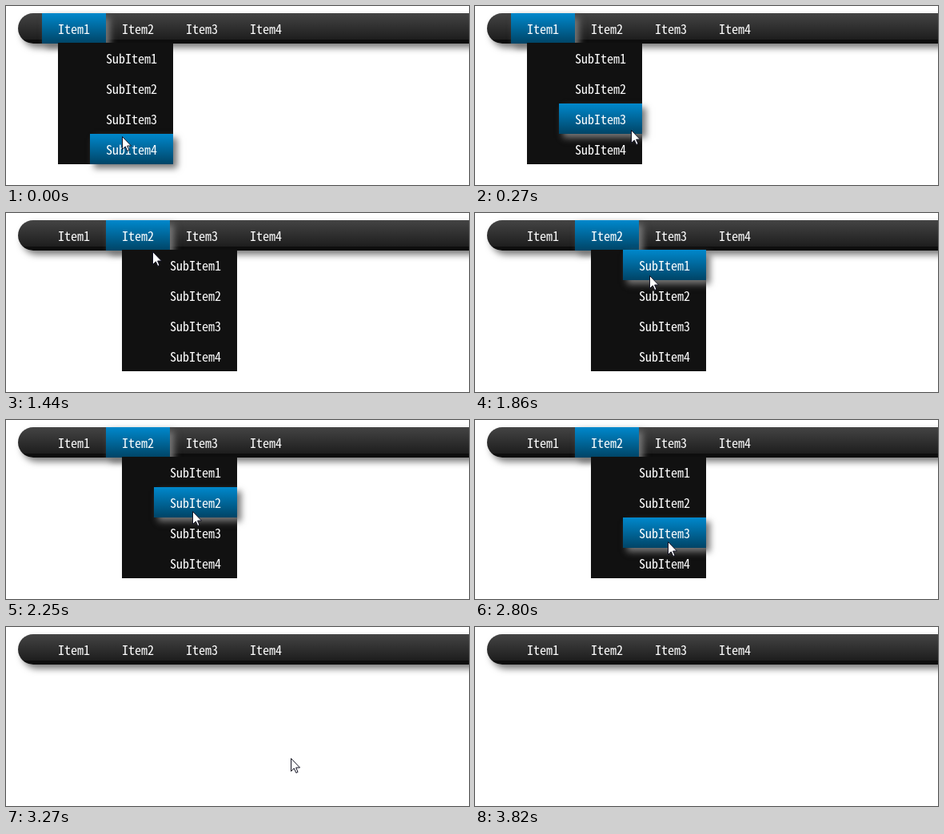
Write an HTML page that moves like this. It is 579 px wide and 224 px high and loops after 4.18 s.

```html
<!DOCTYPE html>
<html lang="en">
<head>
<meta charset="utf-8">
<title>Drop-down menu</title>
<style>
html, body { margin: 0; width: 100%; height: 100%; overflow: hidden; background: #fff; }
body { position: relative; }
ul { margin: 0; padding: 0; list-style: none; }
.stage {
  position: absolute; left: 0; top: 0; width: 579px; height: 224px; overflow: hidden;
  font: 16px/38px "Noto Sans Mono CJK SC", "Noto Sans Mono CJK JP", "Liberation Mono", monospace;
  color: #fff; white-space: nowrap;
}
.stage * { position: absolute; }
.bar {
  left: 15px; top: 9px; width: 640px; height: 38px; border-radius: 19px;
  background: linear-gradient(#444, #1e1e1e 86%, #0e0e0e 88%, #0e0e0e);
}
.bar, .hot { box-shadow: 5px 5px 8px #777; }
.hot { height: 38px; background: linear-gradient(#08c, #046); }
.drop, .row, .cursor { animation: 4180ms step-end infinite; }
.drop { left: 45px; top: 9px; animation-name: drop; }
.drop > .hot { width: 80px; }
.panel { left: 20px; top: 37px; width: 144px; height: 152px; background: #111; }
.row { left: 40px; top: 0; width: 104px; animation-name: row; }
.panel li { left: 60px; }
li:nth-child(2) { top: 38px; }
li:nth-child(3) { top: 76px; }
li:nth-child(4) { top: 114px; }
.items { left: 65px; top: 9px; }
.items li { top: 0; }
.items li:nth-child(2) { left: 80px; }
.items li:nth-child(3) { left: 160px; }
.items li:nth-child(4) { left: 240px; }
.cursor { left: 0; top: 0; animation-name: cursor; }

@keyframes drop {
  0% { transform: none; opacity: 1; }
  9.33% { transform: none; opacity: 0; }
  23.444% { transform: translateX(80px); opacity: 1; }
  78.229%, 100% { transform: translateX(80px); opacity: 0; }
}
@keyframes row {
  0% { transform: translateY(114px); opacity: 1; }
  6.459% { transform: translateY(76px); opacity: 1; }
  9.33% { transform: none; opacity: 0; }
  38.038% { transform: none; opacity: 1; }
  47.368% { transform: translateY(38px); opacity: 1; }
  56.698% { transform: translateY(76px); opacity: 1; }
  70.813%, 100% { transform: translateY(114px); opacity: 1; }
}
@keyframes cursor {
  0% { transform: translate(145px, 163px); }
  2.87% { transform: translate(147px, 163px); }
  6.459% { transform: translate(195px, 155px); }
  9.33% { transform: translate(234px, 144px); }
  12.918% { transform: translate(228px, 138px); }
  16.028% { transform: translate(219px, 129px); }
  19.617% { transform: translate(172px, 63px); }
  23.444% { transform: translate(167px, 43px); }
  27.033% { transform: translate(167px, 40px); }
  34.449% { transform: translate(183px, 48px); }
  38.038% { transform: translate(197px, 58px); }
  41.148% { transform: translate(210px, 69px); }
  44.497% { transform: translate(218px, 78px); }
  47.368% { transform: translate(226px, 92px); }
  50.239% { transform: translate(231px, 104px); }
  53.827% { transform: translate(233px, 114px); }
  56.698% { transform: translate(233px, 128px); }
  59.808% { transform: translate(233px, 143px); }
  66.985% { transform: translate(241px, 152px); }
  70.813% { transform: translate(241px, 162px); }
  74.401% { transform: translate(243px, 162px); }
  78.229% { transform: translate(356px, 164px); }
  85.406% { transform: translate(455px, 192px); }
  88.516% { transform: translate(523px, 212px); }
  91.387%, 100% { transform: translate(560px, 240px); }
}
</style>
</head>
<body>
<div class="stage">
  <div class="bar"></div>
  <div class="drop">
    <div class="hot"></div>
    <div class="panel">
      <div class="hot row"></div>
      <ul>
        <li>SubItem1</li>
        <li>SubItem2</li>
        <li>SubItem3</li>
        <li>SubItem4</li>
      </ul>
    </div>
  </div>
  <ul class="items">
    <li>Item1</li>
    <li>Item2</li>
    <li>Item3</li>
    <li>Item4</li>
  </ul>
  <svg class="cursor" width="13" height="20">
    <path d="M.5.5V16.5L4.3 12.9 6.8 18.5 9 17.5 6.6 12H11.5Z" fill="#fff" stroke="#112"/>
  </svg>
</div>
</body>
</html>
```
